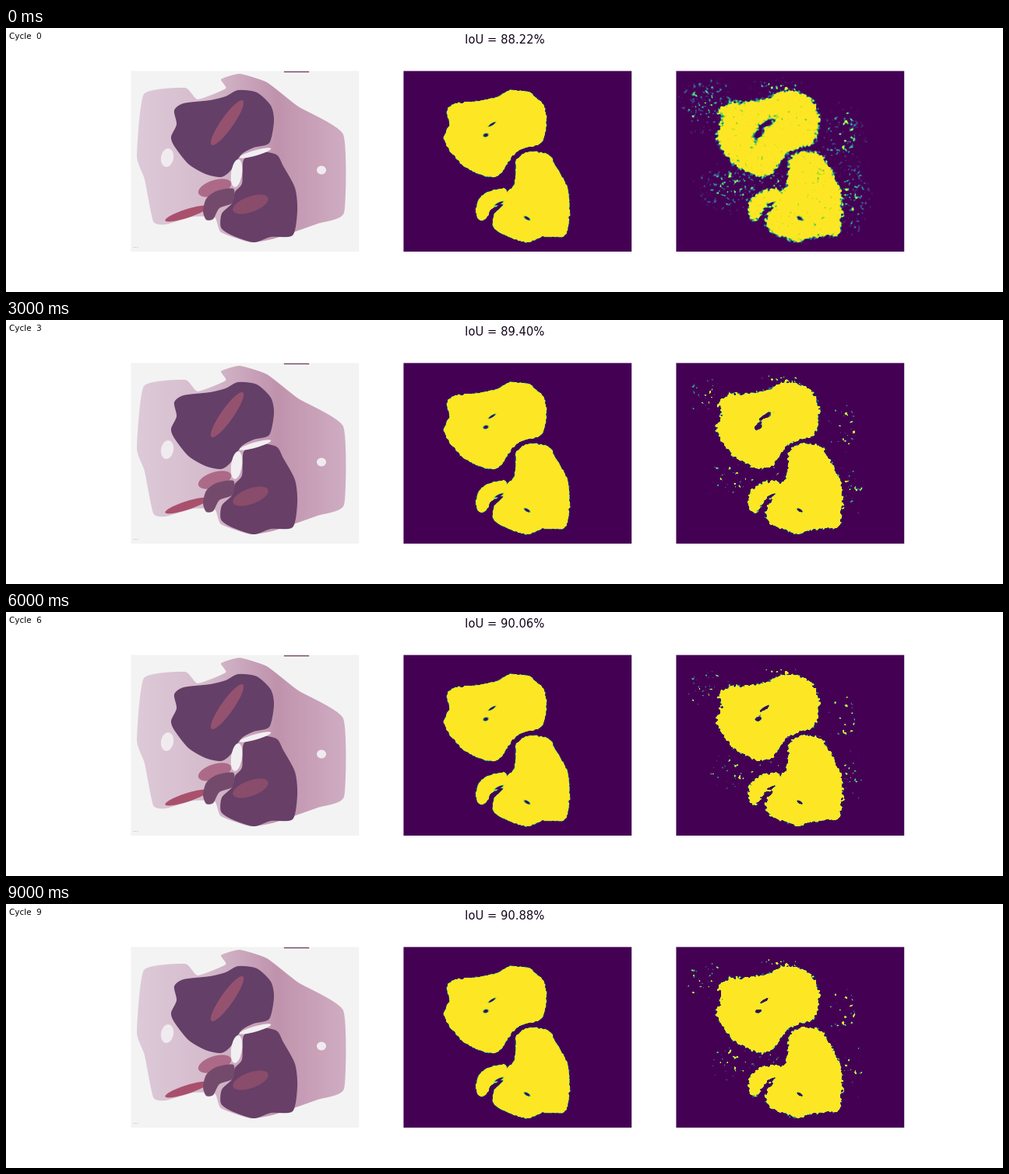
Recreate the animation shown at these times as a matplotlib script. Size 1280 px wide and 340 px high, loop 10 s.

```python
import matplotlib.pyplot as plt
import numpy as np
from matplotlib.animation import FuncAnimation
from matplotlib.colors import LinearSegmentedColormap
from matplotlib.patches import Ellipse, Polygon
from matplotlib.path import Path

WIDTH, HEIGHT, DPI = 1280, 340, 100
PITCH, TOP = 350, 56
PANEL_W, PANEL_H = 292, 232
LEFT, MIDDLE, RIGHT = 161, 511, 861
CYCLES = 10
IOU = [88.22, 89.05, 89.04, 89.40, 89.63, 89.86, 90.06, 90.26, 90.57, 90.88]

# Key points of the tumour outlines, placed in the middle panel
UPPER = [(562, 140), (569, 124), (566, 106), (578, 97), (612, 93), (632, 88),
         (648, 80), (672, 83), (690, 100), (694, 120), (688, 148), (668, 154),
         (652, 163), (638, 184), (626, 192), (606, 188), (584, 175), (566, 152)]
LOWER = [(655, 170), (672, 159), (697, 163), (706, 178), (721, 206),
         (724, 235), (718, 267), (690, 269), (668, 276), (640, 267),
         (626, 257), (627, 239), (640, 226), (644, 211), (653, 200)]
LOBE = [(603, 236), (607, 220), (620, 210), (642, 207), (641, 225),
        (624, 232), (616, 246), (607, 247)]
TISSUE = [(177, 85), (230, 77), (246, 92), (282, 78), (276, 66), (300, 59),
          (335, 70), (375, 101), (433, 137), (434, 238), (400, 252),
          (345, 271), (314, 276), (276, 263), (268, 244), (240, 243),
          (205, 253), (189, 249), (178, 195), (168, 165)]


def smooth(points, pull=.38, steps=10):
    """Closed curve through the key points, as cubic Hermite pieces."""
    p = np.array(points, float)
    tangent = pull * (np.roll(p, -1, 0) - np.roll(p, 1, 0))
    t = np.linspace(0, 1, steps, endpoint=False)[None, :, None]
    start, end = p[:, None], np.roll(p, -1, 0)[:, None]
    leave, arrive = tangent[:, None], np.roll(tangent, -1, 0)[:, None]
    ease = t * t * (3 - 2 * t)
    curve = (start + (end - start) * ease
             + leave * t * (1 - t) ** 2 - arrive * t * t * (1 - t))
    return curve.reshape(-1, 2)


OUTLINES = [smooth(points) for points in (UPPER, LOWER, LOBE)]
GRID_X, GRID_Y = np.meshgrid(MIDDLE + np.arange(PANEL_W) + .5,
                             TOP + np.arange(PANEL_H) + .5)


def blur(field, sigma):
    fy = np.fft.fftfreq(PANEL_H)[:, None]
    fx = np.fft.rfftfreq(PANEL_W)[None, :]
    kernel = np.exp(-2 * (np.pi * sigma) ** 2 * (fx ** 2 + fy ** 2))
    return np.fft.irfft2(np.fft.rfft2(field) * kernel, field.shape)


def noise(seed, sigma):
    rng = np.random.default_rng(seed)
    field = blur(rng.normal(size=(PANEL_H, PANEL_W)), sigma)
    return field / field.std()


def tumour_fill():
    points = np.column_stack([GRID_X.ravel(), GRID_Y.ravel()])
    inside = np.any([Path(o).contains_points(points) for o in OUTLINES], axis=0)
    return inside.reshape(PANEL_H, PANEL_W).astype(float)


def bump(x, y, rx, ry, angle=0):
    """Rotated bell that falls to one half on the given ellipse."""
    c, s = np.cos(np.radians(angle)), np.sin(np.radians(angle))
    dx, dy = GRID_X - x, GRID_Y - y
    u, v = (dx * c + dy * s) / rx, (dy * c - dx * s) / ry
    return .5 ** (u * u + v * v)


def bumps(*ellipses):
    return np.max([bump(*ellipse) for ellipse in ellipses], axis=0)


def sigmoid(value):
    return 1 / (1 + np.exp(-value))


FILL = tumour_fill()
HOLES = bumps((616, 138, 3.2, 2.2, -15), (624, 124, 5, 1.3, -32),
              (633, 226, 5.5, 1.4, -25), (669, 245, 4, 1.7, 30))
CRACK = bumps((617, 134, 9, 3.6, -58), (629, 122, 9, 3.6, -32))
SCATTER = bumps((551, 100, 26, 28), (580, 206, 32, 22), (735, 215, 18, 40),
                (727, 140, 20, 30), (632, 198, 14, 12), (640, 76, 24, 8))


def true_mask():
    body = blur(FILL, .9)
    edge = 4 * body * (1 - body)
    return sigmoid(7 * (2 * body - 1 + .35 * edge * noise(4, 1.2)
                        - 2 * HOLES * body))


def predict(cycle):
    early = np.exp(-2 * cycle)
    body = blur(FILL, 2)
    edge = 4 * body * (1 - body)
    texture = .93 * noise(11, 1.1) + .36 * noise(50 + cycle, 1)
    spread = (.42 * edge + (.05 + .17 * early) * body
              + (.7 + .15 * early) * SCATTER * (1 - body) + .25 * CRACK)
    score = (2 * body - 1 + spread * texture - 2 * HOLES * body
             - 2.4 * np.exp(-cycle / 5) * CRACK)
    gain = 12 - 8 * np.exp(-cycle / 1.2)
    return np.clip((sigmoid(gain * score) - .06) / .88, 0, 1)


def draw_slide():
    frame(LEFT, "#f3f3f3")
    tissue = Polygon(smooth(TISSUE, .25), fc="none", lw=0)
    ax.add_patch(tissue)
    tones = LinearSegmentedColormap.from_list(
        "tissue", ["#ddcad8", "#d6bccd", "#c093ad", "#d0aec3"])
    ax.imshow(np.linspace(0, 1, 256)[None], cmap=tones, aspect="auto",
              extent=(165, 440, 285, 55), interpolation="bilinear",
              clip_path=tissue)
    for color, x, y, w, h, angle in [("#a9506d", 232, 239, 58, 11, -18),
                                     ("#ac6a88", 268, 206, 44, 20, -18)]:
        ax.add_patch(Ellipse((x, y), w, h, angle=angle, color=color, lw=0))
    for outline, color in zip(OUTLINES, ("#643f68", "#673f67", "#744a6c")):
        ax.add_patch(Polygon(outline - (PITCH, 0), color=color, lw=0))
    for color, x, y, w, h, angle in [("#94526f", 284, 122, 70, 16, -55),
                                     ("#8a4c6b", 314, 227, 48, 20, -20),
                                     ("#f2eff2", 296, 187, 14, 36, 8),
                                     ("#f2eff2", 320, 161, 42, 7, -16),
                                     ("#f0ebef", 207, 167, 16, 24, 10),
                                     ("#f0ebef", 405, 183, 12, 11, 0)]:
        ax.add_patch(Ellipse((x, y), w, h, angle=angle, color=color, lw=0))
    ax.plot([357, 388], [55.6, 55.6], color="#6b3a5b", lw=.9)
    ax.plot([163, 170], [282, 282], color="#b5b5b5", lw=.7, ls=":")


def frame(left, color):
    """Backing whose soft edges reach slightly past the panel's pixels."""
    x0, x1, y0, y1 = left - .6, left + PANEL_W + .2, TOP - .6, TOP + PANEL_H
    ax.add_patch(Polygon([(x0, y0), (x1, y0), (x1, y1), (x0, y1)],
                         color=color, lw=0, snap=False))


def show_panel(data, left):
    frame(left, plt.get_cmap("viridis")(0.))
    return ax.imshow(data, cmap="viridis", vmin=0, vmax=1, aspect="auto",
                     interpolation="nearest", zorder=2,
                     extent=(left, left + PANEL_W, TOP + PANEL_H, TOP))


def write(x, baseline, pixels, **style):
    return ax.text(x, baseline, "", va="baseline", family="DejaVu Sans",
                   fontsize=pixels * 72 / DPI, **style)


fig = plt.figure(figsize=(WIDTH / DPI, HEIGHT / DPI), dpi=DPI, facecolor="white")
ax = fig.add_axes([0, 0, 1, 1])
draw_slide()
show_panel(true_mask(), MIDDLE)
predictions = [predict(cycle) for cycle in range(CYCLES)]
prediction = show_panel(predictions[0], RIGHT)
title = write(640.3, 19.6, 14.7, ha="center", color="#12031a")
label = write(4.3, 14, 10.4, ha="left", color="black")
ax.set(xlim=(0, WIDTH), ylim=(HEIGHT, 0))
ax.axis("off")
# Images default to a lower layer than patches, so the gradient is kept in order
for order, artist in enumerate(ax.get_children()):
    artist.set_zorder(order)
for layer, image in enumerate(ax.images):
    image.set_zorder(1.5 if layer == 0 else 100)


def update(cycle):
    prediction.set_data(predictions[cycle])
    title.set_text(f"IoU = {IOU[cycle]:.2f}%")
    label.set_text(f"Cycle  {cycle}")
    return prediction, title, label


animation = FuncAnimation(fig, update, frames=CYCLES, interval=1000, repeat=True)
plt.show()
```
